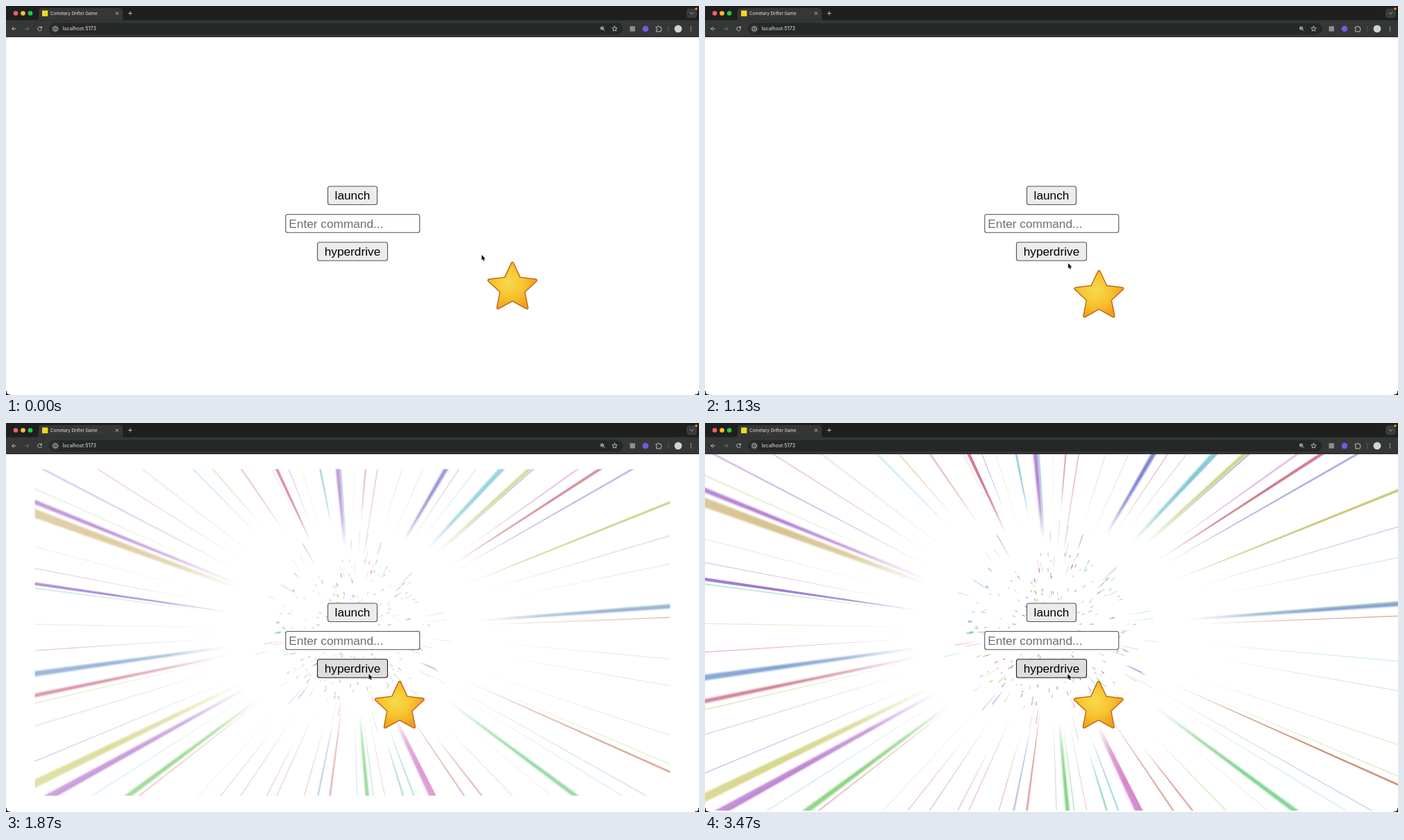
An HTML page with a canvas for the animation above (4.4 s loop, 998x561 px).

```html
<!DOCTYPE html>
<html lang="en">
<head>
<meta charset="utf-8">
<title>Cometary Drifter Game</title>
<style>
  html, body { margin: 0; width: 100%; height: 100%; overflow: hidden; background: #fff; }
  canvas, svg { position: absolute; left: 0; display: block; }
  canvas { top: 45px; width: 998px; height: 514px; opacity: 0; }
  svg { top: 0; }
  .ui { font-family: Inter, "Open Sans", sans-serif; fill: #e6e6e6; }
  .form { font: 17.25px "Liberation Sans", Arial, sans-serif; }
  .line { fill: none; stroke: #c9c9c9; stroke-width: .9; stroke-linecap: round; stroke-linejoin: round; }
  .box { stroke: #555; stroke-width: 1.1; fill: #ebecec; }
  .hover { stroke: #1c1c1c; fill: #dedede; }
</style>
</head>
<body>
<canvas id="warp" width="998" height="514"></canvas>
<svg width="998" height="561" viewBox="0 0 998 561">
  <defs>
    <radialGradient id="gold" cx=".42" cy=".42" r=".62">
      <stop offset="0" stop-color="#f4da4e"/>
      <stop offset=".5" stop-color="#f8c630"/>
      <stop offset="1" stop-color="#f29f1c"/>
    </radialGradient>
  </defs>

  <rect width="998" height="21" fill="#1e1f1f"/>
  <rect y="20.5" width="998" height="24.5" fill="#353636"/>
  <rect y="44" width="998" height="1" fill="#2a2a2a"/>
  <path d="M43 20.6Q47 20.6 47 16.5V7.5Q47 3 51.5 3H163.5Q168 3 168 7.5V16.5Q168 20.6 172 20.6Z" fill="#353636"/>
  <circle cx="14" cy="10.5" r="3.3" fill="#fe5f57"/>
  <circle cx="24.5" cy="10.5" r="3.3" fill="#febc2e"/>
  <circle cx="35" cy="10.5" r="3.3" fill="#28c840"/>
  <rect x="52" y="6.5" width="8.3" height="8.3" fill="#f2d91f"/>
  <text class="ui" x="64" y="12.6" font-size="6.2">Cometary Drifter Game</text>
  <path class="line" d="M158 8.6l3.8 3.8m0-3.8l-3.8 3.8M176.4 10.5h5M178.9 8v5"/>
  <rect x="980" y="3.5" width="15" height="14" rx="4.5" fill="#3a3b3b"/>
  <path class="line" d="M985.6 9.6l2 2 2-2"/>
  <circle cx="994" cy="4" r="1.7" fill="#f39a1d"/>

  <rect x="62" y="24.8" width="826.5" height="16.4" rx="8.2" fill="#262727"/>
  <path class="line" d="M14.4 32.9H8.8m2.5-2.6l-2.6 2.6 2.6 2.6"/>
  <path class="line" style="stroke:#747474" d="M27.2 32.9h5.6m-2.5-2.6l2.6 2.6-2.6 2.6"/>
  <path class="line" d="M51 31.2a2.9 2.9 0 1 0 .4 2.4M51.4 29.6v2h-2"/>
  <circle cx="71" cy="32.9" r="6" fill="#393a3a"/>
  <circle class="line" cx="71" cy="32.9" r="3.2"/>
  <path class="line" d="M71 32.7v1.6M71 31.2v.1"/>
  <text class="ui" x="81.5" y="35.3" font-size="7.2">localhost:5173</text>
  <circle class="line" cx="858.5" cy="32" r="2.2"/>
  <path class="line" d="M860.2 33.7l2.2 2.2M857.5 32h2M858.5 31v2"/>
  <path class="line" id="mark"/>
  <rect x="898.5" y="29.2" width="7.4" height="7.4" fill="#8b8f8f"/>
  <circle cx="921" cy="32.9" r="4.4" fill="#7359dc"/>
  <path class="line" d="M936.5 30.3h2a1.2 1.2 0 0 1 2.4 0h2.3v2a1.2 1.2 0 0 1 0 2.4v2.2h-6.7v-2.2a1.2 1.2 0 0 0 0-2.4z"/>
  <path d="M954 28.8v8.2" stroke="#5b5b5b"/>
  <circle cx="968" cy="32.9" r="5.4" fill="#cfd4d4"/>
  <path class="line" style="stroke-width:1.6" d="M986.5 30.1v.01m0 2.8v.01m0 2.8v.01"/>

  <g class="form">
    <rect class="box" x="463.5" y="260" width="71" height="26.5" rx="3"/>
    <text x="499" y="279" text-anchor="middle">launch</text>
    <rect class="box" x="402.8" y="300.5" width="193" height="26.3" rx="3" style="fill:#fff"/>
    <text x="407.3" y="319.6" fill="#6e6e6e">Enter command...</text>
    <rect class="box" id="drive" x="448.5" y="340.8" width="101" height="26.5" rx="3"/>
    <text x="499" y="360" text-anchor="middle">hyperdrive</text>
  </g>

  <g id="pointer">
    <g transform="translate(44.3 47.6)" stroke-linejoin="round">
      <path class="star" fill="#c0640f" stroke="#c0640f" stroke-width="4.8"/>
      <path class="star" fill="url(#gold)" stroke="url(#gold)" stroke-width="2"/>
    </g>
    <path d="M0 0V7.6L1.7 6.1 2.8 8.7 4.1 8.1 3 5.6H5.3Z" stroke="#fff" stroke-width=".7" paint-order="stroke"/>
  </g>

  <path d="M0 555V561H6Q0 561 0 555ZM998 555V561H992Q998 561 998 555Z" stroke="#000" stroke-width=".8"/>
</svg>
<script>
const LOOP = 4400, STEP = 1000 / 15, TAU = 2 * Math.PI;
const $ = id => document.getElementById(id);
const warp = $('warp'), pointer = $('pointer'), drive = $('drive');

function starPath(R, r, cx = 0, cy = 0) {
  const pts = Array.from({ length: 10 }, (_, i) => {
    const a = i * TAU / 10, q = i % 2 ? r : R;
    return (cx + q * Math.sin(a)).toFixed(2) + ' ' + (cy - q * Math.cos(a)).toFixed(2);
  });
  return 'M' + pts.join('L') + 'Z';
}
document.querySelectorAll('.star').forEach(p => p.setAttribute('d', starPath(35.3, 17)));
$('mark').setAttribute('d', starPath(3.9, 1.8, 876.5, 33));

let seed = 11;
function rnd(lo = 0, hi = 1) {
  seed = (seed * 16807) % 2147483647;
  return lo + (hi - lo) * seed / 2147483647;
}

// The boldest rays: angle in degrees, width, hue
const bold = [
  [202, 7, 277], [200.2, 14, 43], [188.3, 5, 262], [172.1, 9, 215], [168.3, 6, 347],
  [154.1, 13, 60], [151.1, 11, 285], [143.4, 8, 112], [84.7, 6, 125], [64.2, 10, 302],
  [36.6, 7, 132], [24.1, 3, 17], [-4.2, 6, 220], [-21.9, 4, 64], [-33, 5, 346],
  [-42.2, 6, 68], [-47.1, 8, 186], [-59.7, 7, 238], [-95, 7, 277], [-115, 5, 338]
];

function paintWarp() {
  const c = warp.getContext('2d');
  c.translate(498, 253);

  function ray(angle, from, to, width, hue, alpha) {
    const g = c.createLinearGradient(from, 0, to, 0);
    [[0, 0], [.3, .8], [.6, 1], [1, .9]].forEach(([at, k]) =>
      g.addColorStop(at, `hsla(${hue},48%,57%,${alpha * k})`));
    c.save();
    c.rotate(angle);
    c.filter = width > 5 ? 'blur(.8px)' : 'none';
    c.fillStyle = g;
    const a = width * from / to * .35, b = width / 2;
    c.beginPath();
    c.moveTo(from, -a);
    c.lineTo(to, -b);
    c.lineTo(to, b);
    c.lineTo(from, a);
    c.fill();
    c.restore();
  }

  const inner = a => 125 + 70 * Math.abs(Math.cos(a));
  const reach = a => 1.05 * Math.min(500 / Math.abs(Math.cos(a)), 258 / Math.abs(Math.sin(a)));

  for (let i = 0; i < 64; i++) {
    const a = (i + rnd(-.4, .4)) / 64 * TAU;
    ray(a, inner(a) * rnd(.8, 1.3), reach(a), rnd(.8, 3.5), rnd(0, 360), rnd(.12, .65));
  }
  for (const [deg, width, hue] of bold) {
    const a = deg / 360 * TAU;
    ray(a, inner(a), reach(a), width, hue, .9 - width * .015);
  }
  // Short streaks, then a ring of dashes
  for (let i = 0; i < 45; i++) {
    const from = rnd(75, 130);
    ray(rnd(0, TAU), from, from * rnd(1.12, 1.35), rnd(.7, 1.8), rnd(0, 360), rnd(.25, .6));
  }
  for (let i = 0; i < 190; i++) {
    const r = rnd(35, 118);
    ray(rnd(0, TAU), r, r + rnd(3, 4 + r * .06), rnd(1, 2), rnd(0, 360), rnd(.4, .85));
  }
}

function smooth(t, start, length) {
  const k = Math.min(1, Math.max(0, (t - start) / length));
  return k * k * (3 - 2 * k);
}

// Sweep left in an arc, drift a little, then settle on the button
function cursor(n) {
  const sweep = smooth(n, 1, 8), drift = smooth(n, 10, 4);
  const left = 1 - Math.min(1, Math.max(0, (n - 15) / 8));
  return [
    685 - 155 * sweep - 1.5 * drift - 6 * (1 - left ** 8),
    359 + 27 * sweep + 57 * sweep * (1 - sweep) - drift - 23 * (1 - left ** 3.3)
  ];
}

function draw(t) {
  const n = Math.floor((t + 4) / STEP);
  const [x, y] = cursor(n);
  pointer.setAttribute('transform', `translate(${x} ${y})`);
  drive.setAttribute('class', y < 367 && x < 550 ? 'box hover' : 'box');
  const p = smooth(n * STEP, 1665, 272);
  warp.style.opacity = p;
  warp.style.transform = `scale(${.5 + p / 2})`;
}

paintWarp();
const start = performance.now();
function tick() {
  draw((performance.now() - start) % LOOP);
  requestAnimationFrame(tick);
}
draw(0);
requestAnimationFrame(tick);
</script>
</body>
</html>
```
